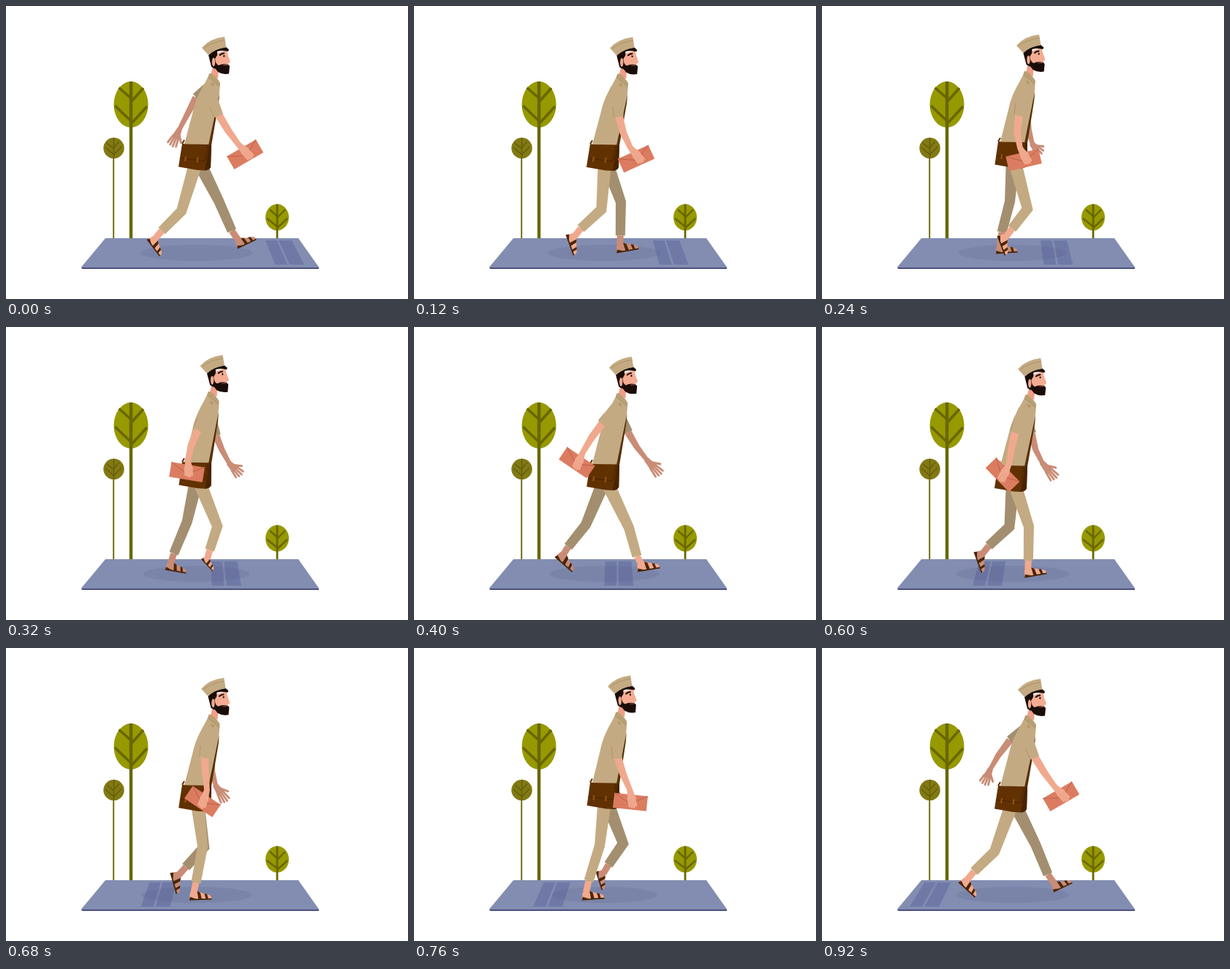
An HTML page with a canvas for the animation above (0.96 s loop, 550 by 400 pixels).

```html
<!DOCTYPE html>
<html lang="en">
<head>
<meta charset="utf-8">
<title>Walking postman</title>
<style>
html, body { margin: 0; width: 100%; height: 100%; overflow: hidden; background: #fff; }
canvas { display: block; width: 550px; height: 400px; }
</style>
</head>
<body>
<canvas id="stage" width="550" height="400"></canvas>
<script>
const ctx = document.getElementById('stage').getContext('2d');
const LOOP = 960, STEP = 40;
const C = {
  khaki: '#c4aa82', khakiFar: '#a38f6f', seam: '#a58c60',
  skin: '#f0a98e', skinFar: '#c98c76', hair: '#1a0d08',
  bag: '#613102', bagSide: '#482301', sandal: '#4a2607',
  letter: '#db7c60', fold: '#b9604a',
  leaf: '#979900', bark: '#686700'
};

// time, knee, cuff, heel, toe
const LEG = [
  [0, 240, 280, 213, 307, 193, 319, 210, 341],
  [40, 243, 279, 213, 304, 194, 314, 207, 340],
  [200, 271, 277, 246, 304, 225, 312, 233, 340],
  [240, 281, 277, 260, 304, 240, 314, 250, 340],
  [280, 286, 272, 266, 301, 249, 310, 257, 335],
  [400, 294, 274, 305, 313, 306, 334, 336, 329],
  [440, 292, 273, 309, 314, 317, 338, 342, 326],
  [480, 291, 271, 309, 312, 317, 336, 342, 324],
  [520, 294, 274, 303, 315, 304, 339, 332, 329],
  [680, 269, 271, 260, 320, 251, 344, 281, 343],
  [720, 257, 272, 246, 314, 238, 343, 267, 341],
  [760, 254, 270, 239, 318, 230, 344, 260, 342],
  [880, 235, 275, 211, 305, 193, 319, 216, 339],
  [920, 236, 278, 208, 305, 187, 320, 209, 340]
];
// time, sleeve end, elbow, wrist, fingertips, letter centre, letter angle
const NEAR_ARM = [
  [0, 291, 150, 304, 170, 318, 189, 336, 208, 327, 202.5, -30],
  [240, 269, 150, 267, 172, 271, 194, 283, 215, 276, 210, -13],
  [400, 257, 132, 243, 151, 231, 171, 221, 194, 223, 185, 34],
  [520, 258, 138, 248, 157, 239, 181, 227, 202, 230, 193, 50],
  [680, 271, 150, 273, 172, 275, 194, 267, 218, 269, 209.5, 34],
  [760, 278, 151, 286, 172, 295, 193, 300, 218, 296, 210, 6],
  [920, 291, 150, 304, 170, 318, 189, 336, 208, 327, 202.5, -30]
];
// time, sleeve end, elbow, wrist, fingertips
const FAR_ARM = [
  [0, 260, 125, 248, 148, 237, 169, 226, 191],
  [240, 280, 150, 283, 170, 288, 189, 299, 203],
  [400, 293, 144, 305, 164, 319, 182, 337, 202],
  [520, 291, 144, 301, 167, 314, 184, 333, 204],
  [680, 281, 148, 282, 168, 287, 188, 301, 210],
  [760, 272, 150, 272, 168, 272, 188, 272, 206],
  [920, 257, 126, 241, 147, 230, 166, 221, 186]
];
// time, vertical shift of the body; twice per loop
const BOB = [[0, 0], [40, 1.5], [200, -1.2], [240, -3], [280, -4.5], [400, -1.6], [440, 0]];

// Smooth periodic interpolation through a table of poses
function pose(table, time, period = LOOP) {
  const n = table.length, t = time % period;
  const key = i => {
    const turn = Math.floor(i / n), row = table[i - turn * n];
    return { t: row[0] + turn * period, row };
  };
  let i = n - 1;
  while (table[i][0] > t) i--;
  const [a, b, c, d] = [key(i - 1), key(i), key(i + 1), key(i + 2)];
  const h = c.t - b.t, u = (t - b.t) / h, u2 = u * u, u3 = u2 * u;
  return b.row.slice(1).map((p, j) => {
    const k = j + 1, q = c.row[k];
    const m0 = (q - a.row[k]) / (c.t - a.t) * h;
    const m1 = (d.row[k] - p) / (d.t - b.t) * h;
    return p * (2 * u3 - 3 * u2 + 1) + m0 * (u3 - 2 * u2 + u) + q * (3 * u2 - 2 * u3) + m1 * (u3 - u2);
  });
}

function fill(d, color) {
  ctx.fillStyle = color;
  ctx.fill(new Path2D(d));
}
function line(d, color, width, cap = 'butt') {
  ctx.strokeStyle = color;
  ctx.lineWidth = width;
  ctx.lineCap = cap;
  ctx.stroke(new Path2D(d));
}
function oval(x, y, rx, ry, color) {
  ctx.fillStyle = color;
  ctx.beginPath();
  ctx.ellipse(x, y, rx, ry, 0, 0, Math.PI * 2);
  ctx.fill();
}

// Tapered strip along a few joints, mitred at the bends
function limb(pts, widths, color) {
  const angle = (a, b) => Math.atan2(b[1] - a[1], b[0] - a[0]);
  const left = [], right = [];
  pts.forEach((p, i) => {
    const a = i ? angle(pts[i - 1], p) : angle(p, pts[1]);
    const b = i < pts.length - 1 ? angle(p, pts[i + 1]) : a;
    const half = Math.atan2(Math.sin(b - a), Math.cos(b - a)) / 2;
    const r = widths[i] / 2 / Math.max(0.6, Math.cos(half));
    const nx = -Math.sin(a + half) * r, ny = Math.cos(a + half) * r;
    left.push([p[0] + nx, p[1] + ny]);
    right.unshift([p[0] - nx, p[1] - ny]);
  });
  fill('M' + left.concat(right).join('L') + 'Z', color);
  return left;
}

function tree(x, y, rx, ry, trunk, twig, leaf, bark, branches) {
  oval(x, y, rx, ry, leaf);
  line(`M${x} ${y - ry}V317`, bark, trunk);
  line(branches, bark, twig);
}

function scenery(t, dy) {
  tree(171, 134.5, 23.5, 31.5, 4.4, 3.6, C.leaf, C.bark,
    'M154.5 111.5L171 126M188 112L171 131M149 136L171 157M193 137L171 161');
  tree(147.5, 194, 14.2, 14.3, 1.3, 1.1, '#817912', '#625b0c',
    'M138 187L147.5 195M155 185L147.5 193M136 193L147.5 203M158 192L147.5 203');
  line('M146.8 208V317', '#86802a', 1.5);
  tree(371, 288.5, 16, 18, 2.8, 2.4, C.leaf, C.bark,
    'M361 278L371 287M382 278L371 289M357 290L371 301M385 290L371 303');
  fill('M136 317H400L428 356.500H103Z', '#828db1');
  fill('M103 356.500H428V359H104Z', '#4b5080');

  const top = 355 - t * 0.2333, low = 368 - t * 0.2696;
  const stripe = (a, b, c, d) =>
    fill(`M${top + a} 320H${top + b}L${low + d} 353H${low + c}Z`, 'rgba(70,75,140,.3)');
  oval(260.5, 337, 76.9 + dy * 1.08, 11, '#7a84a9');
  stripe(0, 15.5, 0, 17);
  stripe(18, 36, 20, 40);
}

function foot([hx, hy], [tx, ty], cuff, skin) {
  const a = Math.atan2(ty - hy, tx - hx), s = Math.hypot(tx - hx, ty - hy) / 29;
  const ax = hx + (Math.cos(a) * 6 + Math.sin(a) * 10) * s;
  const ay = hy + (Math.sin(a) * 6 - Math.cos(a) * 10) * s;
  limb([cuff, [ax, ay]], [9, 9], skin);
  ctx.save();
  ctx.translate(hx, hy);
  ctx.rotate(a);
  ctx.scale(s, s);
  fill('M0 -1L1 -9Q3 -13 10 -12Q17 -8 26 -6Q30 -4 29 -1Z', skin);
  fill('M0 0L1 -4L9 -1ZM10.500 -11.500L14.500 -9.500L16.500 0H12Z', C.sandal);
  fill('M20 -7.800L23.500 -7L25 0H22Z', C.sandal);
  line('M0 -.3H29.500', C.sandal, 1.8);
  ctx.restore();
}

function leg(time, dy, shift, cloth, skin) {
  const [kx, ky, cx, cy, hx, hy, tx, ty] = pose(LEG, time);
  const cuff = [cx, cy + shift];
  foot([hx, hy + shift], [tx, ty + shift], cuff, skin);
  limb([[261.5, 208 + dy], [kx, ky + shift], cuff], [19, 14, 13], cloth);
}

function hand([wx, wy], [ex, ey], spread, thumb, skin) {
  const a = Math.atan2(ey - wy, ex - wx), len = Math.hypot(ex - wx, ey - wy);
  ctx.save();
  ctx.translate(wx, wy);
  ctx.rotate(a);
  const p = len * 0.48;
  fill(`M-2 -3.500L${p} -5.500L${p + 2} 5.500L-2 3.500Z`, skin);
  for (let i = 0; i < 4; i++) {
    const y = (i - 1.5) * 2.8;
    const tip = len - Math.abs(i - 1.3) * 1.6;
    line(`M${p - 1} ${y}L${tip} ${y * spread}`, skin, 2.9, 'round');
  }
  line(`M${p * 0.5} -3L${p + thumb * 0.4} ${-3 - thumb}`, skin, 3, 'round');
  ctx.restore();
}

function torso() {
  fill('M283 83L291 86L290 99L280 95Z', '#ee9f86');
  fill('M278 93C272 108 262 118 256 143L244 188.500L278 189L291 128L293 106Q290 100 281 92Z', C.khaki);
  fill('M292 120L291 132L281 190H277Z', '#573006');
  fill('M278 92L281 92Q290 99 293 105L291.500 110L286 104L277 97Z', '#b89f74');
  line('M277 97L286 104L291.500 110', C.seam, 0.8);
  fill('M281 104L285.500 107L284 110L280.500 108Z', '#b2986b');
}

function bag() {
  fill('M241 188H281L280 220Q278 224 272 224.500L262 224L236 219.500Z', C.bag);
  fill('M278 188H281L280 220Q278 224 272 224.500L274 213Z', C.bagSide);
  line('M238 207.500L272 211.500L276 190', C.bagSide, 1);
  line('M241 188L244 183', C.bag, 2);
  line('M246 205.500L245 212M262.500 206.500L261.500 213.500', '#98540f', 2);
}

function head() {
  fill('M284 66L302 60L304 68L307 76L304 79L304 84L287 87Z', '#f3ac92');
  fill('M277 67L289 60L289 67L286 72L286 86L281 83Z', C.hair);
  fill('M286 72Q287 80 291 81Q296 78 304 80L306 82L305 92.500Q296 94 290 90L284.500 83Z', C.hair);
  oval(284, 76.500, 2.2, 6, C.skin);
  line('M297 80.800L303 80.600', '#a75446', 0.9);
  line('M292 67.500Q295 64.500 299 64.500', C.hair, 1.8);
  oval(298.300, 68.300, 1.1, 1.4, C.hair);
  fill('M277 67Q286 58 301 56L305 59.500L304 62Q292 59 285 64Z', C.hair);
  fill('M267.800 57Q279 44 299 42L301.300 56.500Q287 58 277 67Z', C.khaki);
  line('M271 57.500Q282 49 299.500 46.500', C.seam, 0.8);
}

function nearArm(t, dy) {
  const [sx, sy, ex, ey, wx, wy, fx, fy, lx, ly, deg] = pose(NEAR_ARM, t);
  const tip = [sx, sy], wrist = [wx, wy], shoulder = [276.5, 112 + dy];
  const back = [sx + (shoulder[0] - sx) * 0.1, sy + (shoulder[1] - sy) * 0.1];
  limb([back, [ex, ey], wrist], [11, 9.5, 7.5], C.skin);
  const edge = limb([shoulder, tip], [16, 13], C.khaki);
  const mid = edge[0].map((v, i) => v * 0.4 + edge[1][i] * 0.6);
  line(`M${mid}L${edge[1]}`, C.seam, 0.7);

  ctx.save();
  ctx.translate(lx, ly);
  ctx.rotate(deg * Math.PI / 180);
  fill('M-23 -10H23V10.500H-23Z', C.letter);
  line('M-23 -10L-2 1.500Q0 2.500 2 1.500L23 -10', C.fold, 0.9);
  ctx.restore();
  hand(wrist, [fx, fy], 1.05, 2, C.skin);
}

function farArm(t, dy) {
  const [sx, sy, ex, ey, wx, wy, fx, fy] = pose(FAR_ARM, t);
  limb([[sx, sy], [ex, ey], [wx, wy]], [10, 8, 6], C.skinFar);
  hand([wx, wy], [fx, fy], 1.5, 7, C.skinFar);
  limb([[276, 112 + dy], [sx, sy]], [15, 13], C.khakiFar);
}

function draw(t) {
  const [dy] = pose(BOB, t, LOOP / 2);
  const lean = dy * 0.0045;
  ctx.clearRect(0, 0, 550, 400);
  scenery(t, dy);
  farArm(t, dy);
  leg(t + LOOP / 2, dy, -5, C.khakiFar, C.skinFar);
  leg(t, dy, 0, C.khaki, C.skin);
  ctx.save();
  ctx.transform(1, 0, -lean, 1, lean * 188, dy);
  bag();
  torso();
  head();
  ctx.restore();
  nearArm(t, dy);
}

function tick() {
  draw(Math.floor(performance.now() % LOOP / STEP) * STEP);
  requestAnimationFrame(tick);
}
tick();
</script>
</body>
</html>
```
